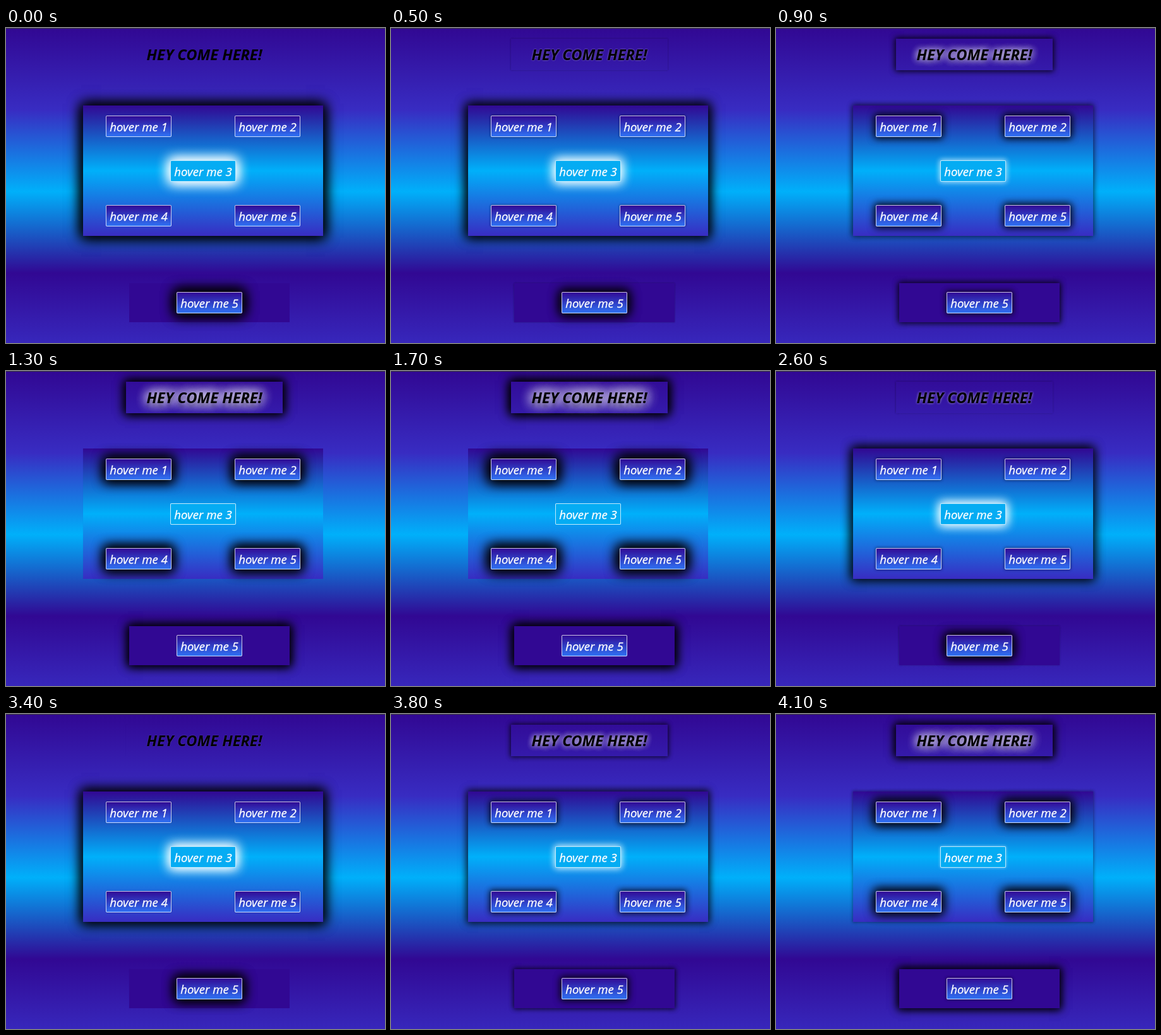
An HTML page that plays this animation: 600 by 500 pixels, repeating every 4200 ms.

```html
<!DOCTYPE html>
<html lang="en">
<head>
<meta charset="utf-8">
<title>Hover glow</title>
<style>
  :root { --p: 0; --q: calc(1 - var(--p)); --dark: #310893; --violet: #382cc2; --cyan: #00b0fa; }
  html, body { margin: 0; width: 100%; height: 100%; overflow: hidden; }
  .stage {
    position: relative; width: 600px; height: 500px; overflow: hidden;
    background: linear-gradient(var(--dark), var(--violet), var(--cyan), var(--dark)) 0 1px / 100% 388px;
    font: italic 500 18.7px "Open Sans", "Noto Sans", sans-serif;
  }
  .stage::before { content: ""; position: absolute; width: 100%; height: 1px; background: #3a3a3c; }
  .stage > * {
    position: absolute; box-sizing: border-box; left: var(--x); top: var(--y);
    display: flex; align-items: center; justify-content: center; white-space: nowrap;
    --rgb: 0, 0, 0; --k: var(--p); --blur: 20px; --spread: 3px;
    --glow: 0 0 calc(var(--blur) * var(--k)) calc(var(--spread) * var(--k)) rgba(var(--rgb), var(--k));
    box-shadow: var(--glow), var(--glow);
  }
  .title {
    --x: 190px; --y: 17px; width: 248px; height: 50px; margin: 0; padding-bottom: 1px;
    font-size: 23.6px; font-weight: 700; color: #000;
    --halo: 0 0 calc(20px * var(--p)) rgba(255, 255, 255, var(--p));
    text-shadow:
      0 calc(6px * var(--p)) 4px rgba(0, 0, 0, calc(.25 * var(--p))),
      var(--halo), var(--halo), var(--halo);
  }
  .panel {
    --x: 122px; --y: 123px; width: 379.5px; height: 207px;
    background: linear-gradient(var(--dark), var(--cyan), var(--violet));
  }
  .footer { --x: 195px; --y: 405px; width: 254px; height: 62px; background: var(--dark); }
  .stage > .title, .stage > .footer { --blur: 16px; --spread: 2px; }
  .btn {
    width: 104px; height: 34px; color: #fff; -webkit-text-stroke: .3px #fff;
    border: 1px solid rgba(255, 255, 255, .75); border-radius: 2px;
    background: linear-gradient(var(--dark), #2f74f6) border-box;
  }
  .stage > .btn { --spread: 4px; }
  .stage > .rev { --k: var(--q); }
  .stage > .light { --rgb: 255, 255, 255; --spread: 2px; background: #05acf3; }
</style>
</head>
<body>
<div class="stage">
  <h1 class="title">HEY COME HERE!</h1>
  <div class="panel rev"></div>
  <div class="footer"></div>
  <div class="btn" style="--x:158px;--y:139px">hover me 1</div>
  <div class="btn" style="--x:362px;--y:139px">hover me 2</div>
  <div class="btn rev light" style="--x:260px;--y:210px">hover me 3</div>
  <div class="btn" style="--x:158px;--y:281px">hover me 4</div>
  <div class="btn" style="--x:362px;--y:281px">hover me 5</div>
  <div class="btn rev" style="--x:270px;--y:419px">hover me 5</div>
</div>
<script>
  const LOOP = 4200, STEP = 100, HALF = 1500, LAG = 80;
  const root = document.documentElement;

  // cubic-bezier(.42, 0, .58, 1), solved by bisection
  function easeInOut(x) {
    let lo = 0, hi = 1, s = .5;
    for (let i = 0; i < 24; i++) {
      s = (lo + hi) / 2;
      const bx = 3 * s * (1 - s) * (.42 * (1 - s) + .58 * s) + s ** 3;
      if (bx < x) lo = s; else hi = s;
    }
    return s * s * (3 - 2 * s);
  }

  const start = performance.now();
  function draw() {
    const t = Math.floor(((performance.now() - start) % LOOP) / STEP) * STEP;
    const phase = Math.abs(t - LAG) / HALF % 2;
    root.style.setProperty("--p", easeInOut(phase > 1 ? 2 - phase : phase).toFixed(4));
    requestAnimationFrame(draw);
  }
  draw();
</script>
</body>
</html>
```
